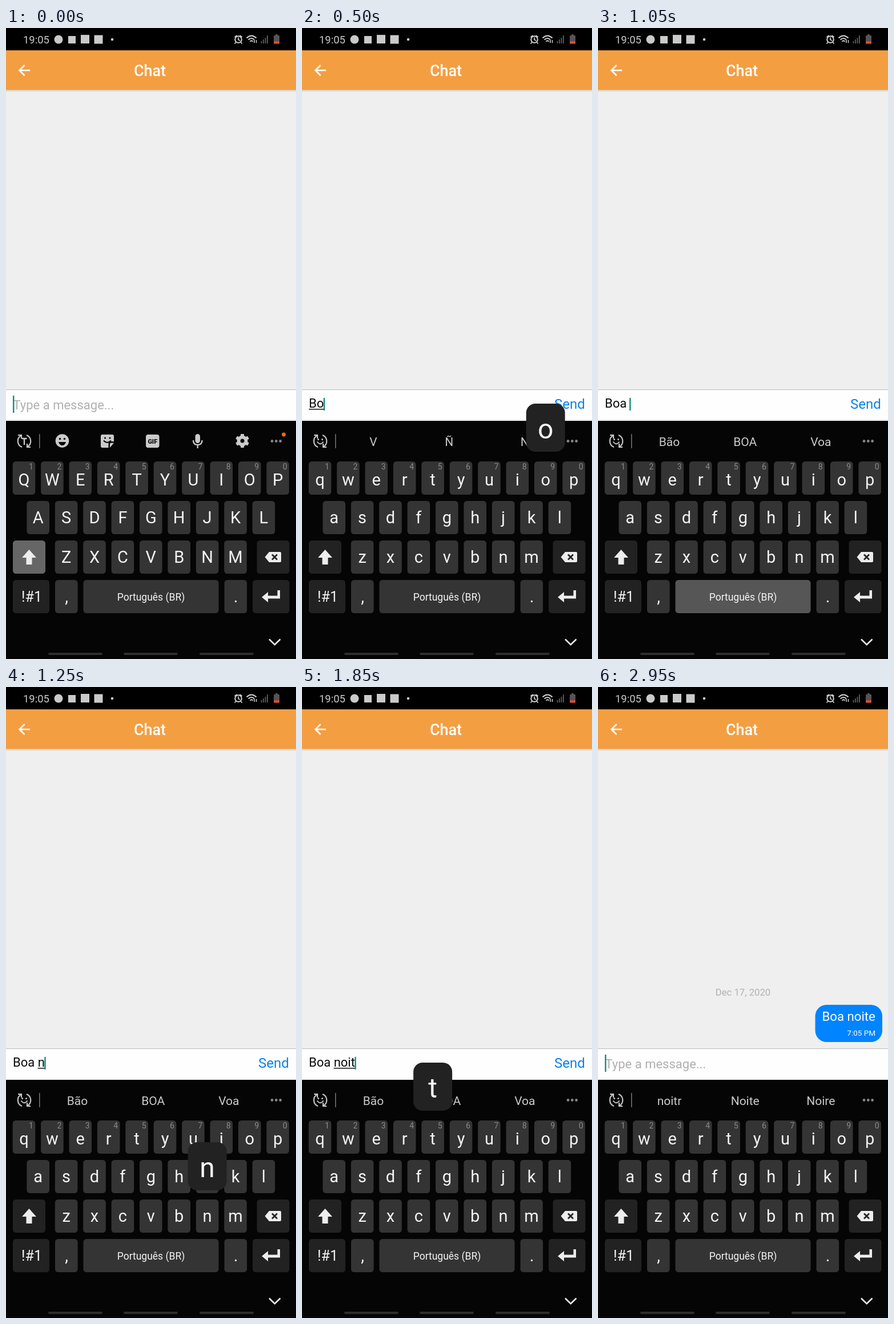
Write an HTML page that moves like this. It is 508 px wide and 1102 px high and loops after 3000 ms.

```html
<!DOCTYPE html>
<html lang="pt-BR">
<head>
<meta charset="utf-8">
<title>Chat</title>
<style>
html, body { margin: 0; width: 100%; height: 100%; overflow: hidden; background: #050505; }
svg { display: block; width: 100vw; height: 100vh; font-family: Roboto, sans-serif; }
text { white-space: pre; }
</style>
</head>
<body>
<svg id="stage" viewBox="0 0 508 1102" preserveAspectRatio="none">
  <defs>
    <linearGradient id="shade" x2="0" y2="1">
      <stop offset="0" stop-color="#cfcac4"/><stop offset="1" stop-color="#efefef"/>
    </linearGradient>
    <g id="cycle" fill="none" stroke="#c4c4c4" stroke-width="2.2">
      <path d="M-4 10.5C-13 7-13.500-5-6-9.500M4-10.500C13-7 13.500 5 6 9.500"/>
      <path d="M-11-10.500H-5V-4.500M11 10.500H5V4.500"/>
    </g>
  </defs>

  <rect width="508" height="1102" fill="#efefef"/>
  <rect width="508" height="40" fill="#000"/>
  <rect y="39" width="508" height="69" fill="#f49e42"/>
  <rect y="108" width="508" height="4" fill="url(#shade)"/>

  <g fill="#cacaca">
    <text x="30" y="27" font-size="18.400">19:05</text>
    <circle cx="92" cy="20" r="7.500"/>
    <rect x="109" y="14" width="13" height="13"/>
    <rect x="131" y="12" width="15" height="15"/>
    <rect x="154.500" y="12.500" width="15" height="15"/>
    <circle cx="186" cy="20" r="2.300"/>
  </g>
  <g fill="none" stroke="#d4d4d4" stroke-width="2">
    <circle cx="407" cy="20" r="5.800"/>
    <path d="M407 16.500V20.500L410 22M400.500 16L404.500 12.800M413.500 16L409.500 12.800M402.500 25L400.500 27.500M411.500 25L413.500 27.500" stroke-width="1.700"/>
    <path d="M421.500 17.500Q430 9.500 438.500 17.500M424.500 20.500Q430 15.500 435 20.500M427.500 23.500Q430 21 432.500 23.500"/>
    <path d="M435 26V21M438.500 21V26" stroke-width="1.500"/>
    <path d="M447.500 27V23M451 27V20M454.500 27V17M458 27V13" stroke="#555" stroke-width="2"/>
  </g>
  <rect x="469" y="13" width="10" height="14" rx="1" fill="#595353"/>
  <rect x="472" y="11" width="4" height="3" fill="#595353"/>
  <rect x="469" y="23.500" width="10" height="4" rx="1" fill="#e4512b"/>

  <path d="M42 74H24M32.500 65L23.500 74L32.500 83" fill="none" stroke="#fff" stroke-width="2.500"/>
  <text x="252" y="84" font-size="27" font-weight="500" fill="#fff" text-anchor="middle">Chat</text>

  <g id="sent">
    <text x="254" y="538.500" font-size="16.700" fill="#b2b2b2" text-anchor="middle">Dec 17, 2020</text>
    <rect x="380.500" y="555" width="117.500" height="65" rx="20" fill="#0084ff"/>
    <text x="392.500" y="583" font-size="22.200" fill="#fff">Boa noite</text>
    <text x="486" y="609" font-size="13.500" fill="#fff" text-anchor="end">7:05 PM</text>
  </g>

  <rect y="631" width="508" height="56" fill="#fefefe"/>
  <rect y="631" width="508" height="1.200" fill="#c4c4c4"/>
  <text id="hint" x="12.500" y="666" font-size="22" fill="#b0b0b0">Type a message...</text>
  <text id="typed" x="12" y="663" font-size="22" fill="#0a0a0a"></text>
  <rect id="line" y="665" height="1.500" fill="#111"/>
  <rect id="caret" width="2.400" fill="#168a80"/>
  <text id="send" x="442" y="665" font-size="24" fill="#0a82e6">Send</text>

  <rect y="686" width="508" height="416" fill="#050505"/>
  <rect x="58" y="709" width="1.500" height="25" fill="#777"/>
  <g id="tools" fill="#cbcbcb">
    <use href="#cycle" x="32" y="721.500"/>
    <path d="M27.500 717H36.500M32 717V728" stroke="#cbcbcb" stroke-width="2.300"/>
    <circle cx="98.500" cy="721" r="11.800"/>
    <circle cx="94.500" cy="717.500" r="1.800" fill="#050505"/>
    <circle cx="102.500" cy="717.500" r="1.800" fill="#050505"/>
    <path d="M92 723H105Q103 729 98.500 729T92 723" fill="#050505"/>
    <path d="M169 710H186Q189 710 189 713V722H183Q179.500 722 179.500 726V733H169Q166 733 166 730V713Q166 710 169 710M182 733V727Q182 724.500 184.500 724.500H189Z"/>
    <circle cx="173.500" cy="716" r="1.600" fill="#050505"/>
    <circle cx="182" cy="716" r="1.600" fill="#050505"/>
    <path d="M171 720.500Q177 727 184 720.500" fill="none" stroke="#050505" stroke-width="2"/>
    <rect x="245" y="710" width="23.500" height="23" rx="4"/>
    <text x="256.800" y="725.500" font-size="11" font-weight="900" fill="#111" text-anchor="middle">GIF</text>
    <rect x="331.500" y="709" width="8.500" height="16" rx="4.250"/>
    <path d="M328 720Q328 728 335.700 728T343.500 720M335.700 728V734" fill="none" stroke="#cbcbcb" stroke-width="2.300"/>
    <circle cx="414" cy="721" r="6.500" fill="none" stroke="#cbcbcb" stroke-width="6"/>
    <g id="teeth"></g>
    <circle cx="486.500" cy="710" r="3.400" fill="#fb6a0c"/>
  </g>
  <g id="words" font-size="21" fill="#cacaca" text-anchor="middle">
    <use href="#cycle" x="32" y="721.500"/>
    <g fill="#c4c4c4">
      <circle cx="28.500" cy="718.500" r="1.500"/><circle cx="35.500" cy="718.500" r="1.500"/>
      <path d="M26.500 722.500Q32 730 37.500 722.500" fill="none" stroke="#c4c4c4" stroke-width="2"/>
    </g>
    <text x="125" y="730"></text><text x="257.700" y="730"></text><text x="390.300" y="730"></text>
  </g>
  <g fill="#858585">
    <circle cx="466" cy="721.500" r="2.400"/><circle cx="473.300" cy="721.500" r="2.400"/><circle cx="480.600" cy="721.500" r="2.400"/>
  </g>

  <g id="keys" text-anchor="middle" fill="#f4f4f4"></g>
  <g fill="#ededed">
    <path d="M40.500 911L53 925H45.500V937H35.500V925H28Z"/>
    <path d="M453.500 924L461 915H480Q482 915 482 917V931Q482 933 480 933H461Z"/>
    <path d="M466 919.500L475 928.500M475 919.500L466 928.500" stroke="#222" stroke-width="2.700"/>
    <path d="M448 994L459 985V991.500H475.500V982H480V996.500H459V1003Z"/>
  </g>
  <path d="M461 1067.500L470.700 1077L480.500 1067.500" fill="none" stroke="#eee" stroke-width="2.500"/>
  <g fill="#2e2e2e">
    <rect x="74" y="1091" width="95" height="4" rx="2"/>
    <rect x="206" y="1091" width="95" height="4" rx="2"/>
    <rect x="339" y="1091" width="95" height="4" rx="2"/>
  </g>

  <g id="popup">
    <rect x="-34" width="68" height="84" rx="16" fill="#222"/>
    <text y="60.500" font-size="48" fill="#f6f6f6" text-anchor="middle"></text>
  </g>
</svg>
<script>
const LOOP = 3000, HOLD = 150, SENT_AT = 2850;
const strokes = [[200, 'B'], [450, 'o'], [650, 'a'], [1000, ' '], [1200, 'n'],
                 [1400, 'o'], [1600, 'i'], [1800, 't'], [2050, 'e']];
const hints = [[200, 'V Ñ N'], [900, 'Bão BOA Voa'], [2200, 'noitr Noite Noire']];
const rows = [['QWERTYUIOP', 31.5, 757, 42], ['ASDFGHJKL', 56.2, 826, 39], ['ZXCVBNM', 105.6, 895, 39]];
const STEP = 49.4, KEY_W = 39.6, KEY_H = 58;

const $ = id => document.getElementById(id);
const keys = $('keys'), popup = $('popup'), typed = $('typed');
const letters = [], spots = {};

function add(parent, tag, attrs, text) {
  const el = document.createElementNS('http://www.w3.org/2000/svg', tag);
  for (const k in attrs) el.setAttribute(k, attrs[k]);
  if (text) el.textContent = text;
  return parent.appendChild(el);
}
const set = (el, attrs) => { for (const k in attrs) el.setAttribute(k, attrs[k]); };
const show = (el, on) => el.setAttribute('visibility', on ? 'visible' : 'hidden');
const write = (el, s) => { if (el.textContent !== s) el.textContent = s; };
const key = (x, y, width, fill) => add(keys, 'rect', { x, y, width, height: KEY_H, rx: 5.5, fill });
const label = (x, y, size, s) => add(keys, 'text', { x, y, 'font-size': size }, s);

for (const [chars, x0, y, base] of rows) {
  [...chars].forEach((c, i) => {
    const x = x0 + i * STEP;
    key(x - KEY_W / 2, y, KEY_W, '#343434');
    letters.push([label(x, y + base, 29, c), c]);
    if (y === 757) set(label(x + 12.5, y + 14, 14, String((i + 1) % 10)), { fill: '#8b8b8b' });
    spots[c] = [x, y - 101 + (y > 757 ? 1 : 0)];
  });
}
const shift = key(12, 895, 57, '#222');
key(439.5, 895, 57, '#222');
key(12, 964, 64, '#222');
key(86, 964, KEY_W, '#343434');
const space = key(135.5, 964, 237, '#343434');
key(382.5, 964, KEY_W, '#343434');
key(432, 964, 64.5, '#222');
label(45, 1002, 25, '!#1');
label(106, 1003, 29, ',');
label(402.5, 1003, 29, '.');
label(254, 999.5, 17.5, 'Português (BR)');

for (let a = 0; a < 360; a += 60)
  add($('teeth'), 'rect', { x: 411, y: 709, width: 6, height: 6, rx: 1, transform: `rotate(${a} 414 721)` });

function draw(t) {
  const done = strokes.filter(s => s[0] <= t);
  const last = done[done.length - 1];
  const text = t < SENT_AT ? done.map(s => s[1]).join('') : '';
  const upper = !last, held = last && t < last[0] + HOLD;

  letters.forEach(([el, c]) => write(el, upper ? c : c.toLowerCase()));
  set(shift, { fill: upper ? '#666' : '#222' });
  set(space, { fill: held && last[1] === ' ' ? '#565656' : '#343434' });

  // message field
  write(typed, text);
  const start = text.lastIndexOf(' ') + 1;
  const end = text ? typed.getComputedTextLength() : 0;
  const from = start ? typed.getSubStringLength(0, start) : 0;
  set($('line'), { x: 12 + from, width: Math.max(0, end - from) });
  set($('caret'), text ? { x: 12 + end - 0.6, y: 646, height: 22 } : { x: 12, y: 642, height: 30 });
  show($('hint'), !text);
  show($('send'), text);
  show($('sent'), t >= SENT_AT);

  // suggestion bar
  show($('tools'), upper);
  show($('words'), !upper);
  const hint = hints.filter(h => h[0] <= t).pop();
  const list = hint ? hint[1].split(' ') : ['', '', ''];
  $('words').querySelectorAll('text').forEach((el, i) => write(el, list[i]));

  const spot = held && spots[last[1].toUpperCase()];
  show(popup, spot);
  if (spot) {
    set(popup, { transform: `translate(${spot})` });
    write(popup.querySelector('text'), last[1]);
  }
}

const t0 = performance.now();
function tick() {
  draw((performance.now() - t0) % LOOP);
  requestAnimationFrame(tick);
}
tick();
</script>
</body>
</html>
```
